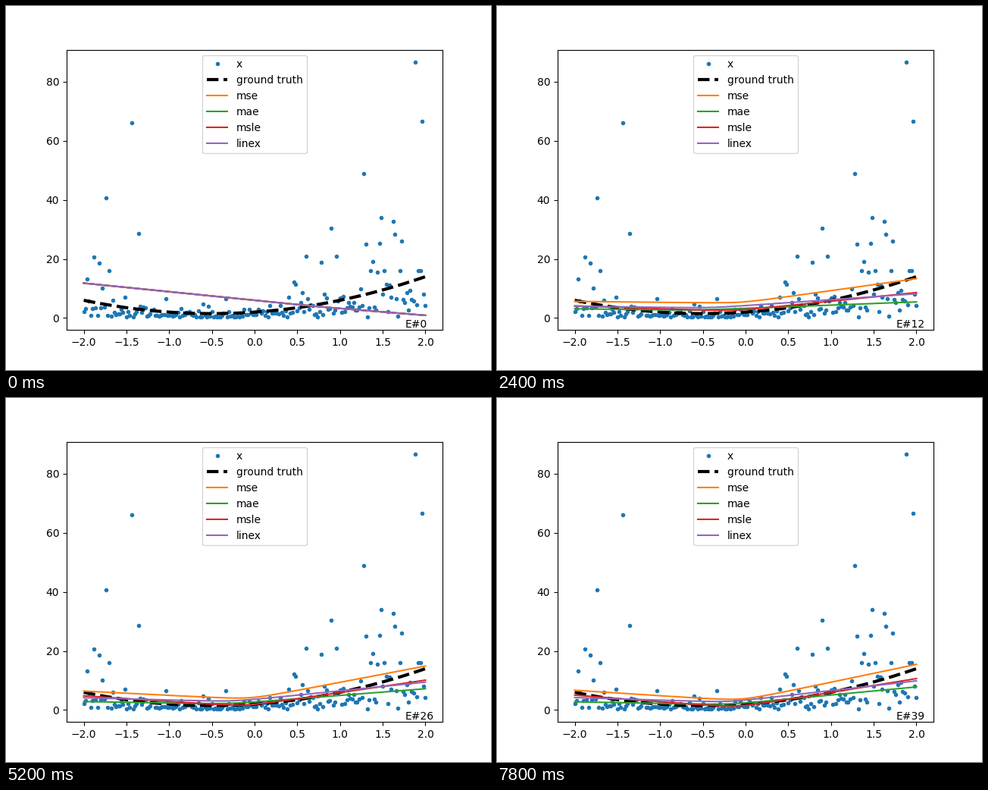
These frames come from a looping animation (640x480 px, 8 s). A matplotlib script:

```python
import numpy as np
import matplotlib.pyplot as plt
from matplotlib.animation import FuncAnimation

plt.rcParams["font.family"] = "DejaVu Sans"

EPOCHS = 40
xs = np.linspace(-2, 2, 201)
truth = 2 * xs**2 + 2 * xs + 2

# Samples: log-normal noise around the parabola, plus the far outliers
rng = np.random.default_rng(4)
ys = np.clip(0.6 * truth * np.exp(0.8 * rng.standard_normal(201)), 0.3, 16)
outliers = {
    -1.88: 20.6, -1.82: 18.6, -1.74: 40.7, -1.44: 66.1, -1.36: 28.6,
    0.6: 20.9, 0.78: 18.9, 0.9: 30.4, 0.96: 20.9, 1.28: 48.9, 1.3: 25.0,
    1.38: 19.1, 1.46: 25.3, 1.48: 34.0, 1.62: 32.7, 1.64: 28.4,
    1.72: 26.0, 1.88: 86.5, 1.96: 66.6,
}
for x, y in outliers.items():
    ys[round((x + 2) * 50)] = y

# Each fit is a rounded hinge: left end, corner height, right end, corner x
key_epochs = np.array([0, 4, 12, 39])
start = (11.8, 3.8, 0.9, 0.75)
fits = {
    "mse": [(8.0, 6.1, 9.0, -0.05), (5.6, 4.95, 13.3, -0.05),
            (6.65, 2.95, 15.4, -0.05)],
    "mae": [(7.0, 4.3, 3.7, 0.4), (3.1, 2.6, 5.45, -0.6),
            (2.75, 1.75, 7.8, -0.2)],
    "msle": [(3.45, 2.95, 6.95, -0.4), (4.1, 2.25, 8.6, -0.15),
             (5.0, 0.7, 10.6, -0.1)],
    "linex": [(6.6, 4.5, 5.1, 0.3), (3.95, 3.35, 8.2, -0.4),
              (4.2, 2.55, 9.85, -0.2)],
}


def hinge(left, corner, right, x0, width=0.2):
    """Two straight arms from the ends, joined by a hyperbola at x0."""
    a = (corner - left) / (x0 + 2)
    b = (right - corner) / (2 - x0)
    d = xs - x0
    return corner + (a + b) / 2 * d + (b - a) / 2 * np.hypot(d, width)


def progress(epoch):
    """Training slows down exponentially."""
    return 1 - np.exp(-epoch / 14)


def curve(name, epoch):
    keys = zip(start, *fits[name])
    return hinge(*(np.interp(progress(epoch), progress(key_epochs), k)
                   for k in keys))


fig, ax = plt.subplots(figsize=(6.4, 4.8), dpi=100)
ax.plot(xs, ys, ".", label="x")
ax.plot(xs, truth, "k--", lw=3, label="ground truth")
lines = {name: ax.plot(xs, curve(name, 0), color=f"C{i}", label=name)[0]
         for i, name in enumerate(fits, 1)}
label = ax.text(0.9, 0.01, "E#0", transform=ax.transAxes)
ax.set_xlim(-2.2, 2.2)
ax.set_ylim(-4.04, 90.8)
ax.legend(loc="upper center")


def draw(epoch):
    for name, line in lines.items():
        line.set_ydata(curve(name, epoch))
    label.set_text(f"E#{epoch}")
    return [*lines.values(), label]


anim = FuncAnimation(fig, draw, frames=EPOCHS, interval=200,
                     repeat=True, repeat_delay=0)
plt.show()
```
